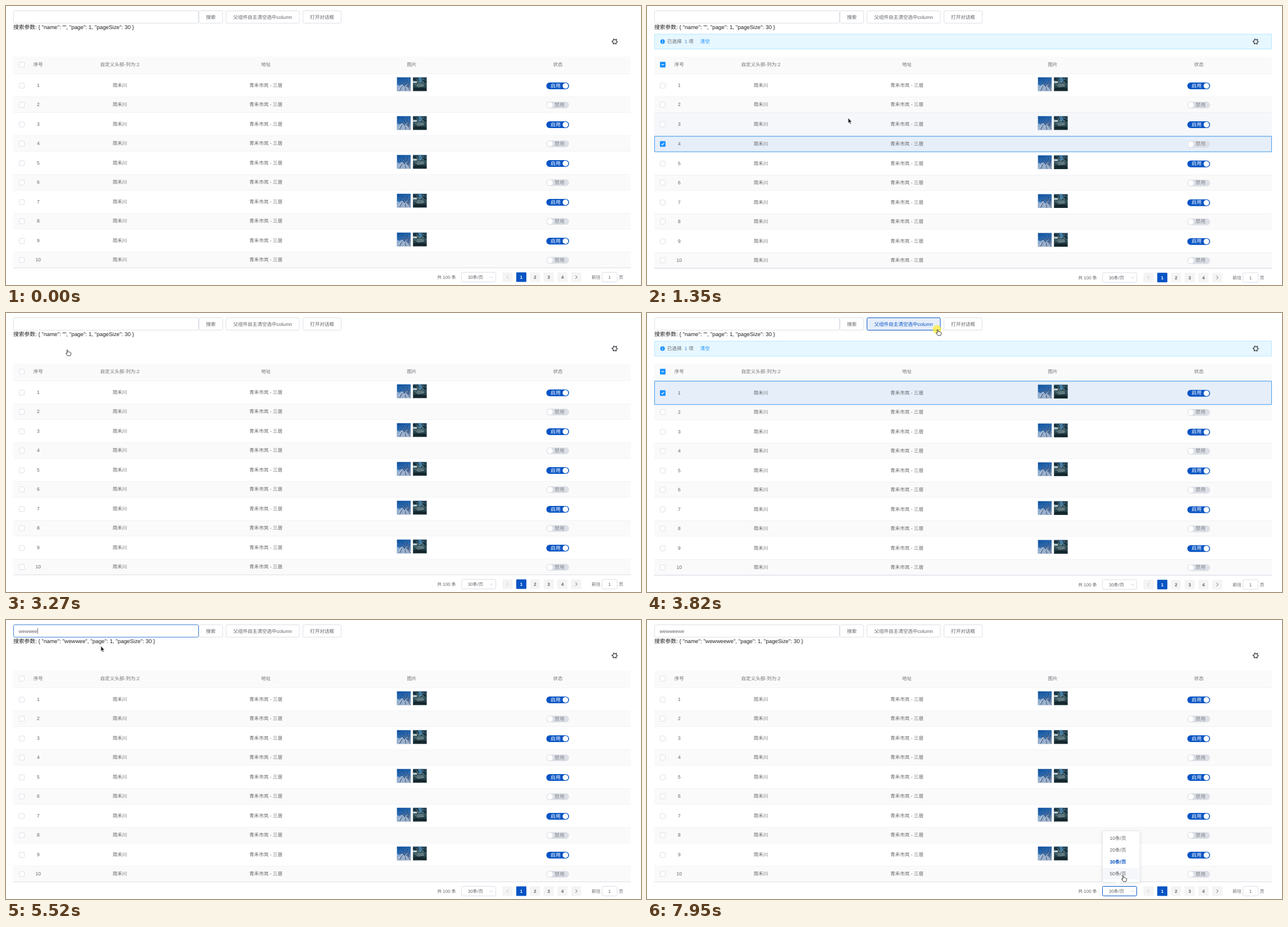
An HTML page that plays this animation: 1130x496 px, repeating every 8 s.

```html
<!DOCTYPE html>
<html lang="zh-CN">
<head>
<meta charset="utf-8">
<title>Table selection</title>
<style>
html, body { margin: 0; width: 100%; height: 100%; overflow: hidden; background: #fff; }
svg { display: block; width: 1130px; height: 496px; }
text {
  font-family: "Liberation Sans", "Noto Sans CJK SC", "Noto Sans CJK", sans-serif;
  text-rendering: geometricPrecision; white-space: pre;
}
</style>
</head>
<body>
<svg id="stage" viewBox="0 0 1130 496" xmlns="http://www.w3.org/2000/svg"></svg>
<script>
const LOOP = 8000, FS = 8.57, SMALL = 7.96, BIG = 9.79;
const BLUE = '#0754c4', SKY = '#1890ff', GREY = '#606266', LINE = '#dcdfe6';
const stage = document.getElementById('stage');
const $ = id => document.getElementById(id);

// Markup helpers: text is placed by its vertical middle.
const text = (x, y, s, o = {}) =>
  `<text x="${x}" y="${y + .36 * (o.size || FS)}" font-size="${o.size || FS}" fill="${o.fill || GREY}"` +
  ` text-anchor="${o.anchor || 'middle'}" ${o.bold ? 'font-weight="700"' : ''} ${o.id ? `id="${o.id}"` : ''}>${s}</text>`;
const rect = (x, y, w, h, fill, more = '') =>
  `<rect x="${x}" y="${y}" width="${w}" height="${h}" fill="${fill}" ${more}/>`;
const line = (d, color, w = 1, more = '') =>
  `<path d="${d}" fill="none" stroke="${color}" stroke-width="${w}" ${more}/>`;
const box = (x, y, w, h, id = '') =>
  rect(x, y, w, h, '#fff', `rx="2" stroke="${LINE}" ${id && `id="${id}"`}`);

const rowTop = i => 120.5 + 34.5 * (i - 1) + (i % 2 ? 0 : 7);
const rowHeight = i => i % 2 ? 41.5 : 27.5;

function check(x, y, id, mark) {
  return `<g transform="translate(${x} ${y})">` +
    rect(-4.5, -4.5, 9, 9, '#fff', `rx="1.2" stroke="${LINE}"`) +
    `<g id="${id}">` + rect(-5, -5, 10, 10, SKY, 'rx="1.4"') + line(mark, '#fff', 1.2) + '</g></g>';
}

function photos(y) {
  const sky = `<g transform="translate(695.7 ${y})">` + rect(0, 0, 24.5, 24.5, 'url(#sky)') +
    '<path d="M0 13L5 15 9 12 14 17 18 16 24.5 21V24.5H0Z" fill="#a9bfd8" opacity=".75"/>' +
    line('M24 24L15 11 10 5M20 18L22 8M16 24L13 14 6 10M17 14L19 4M5 24L9 15', '#39405e', .9) +
    line('M3 21L10 13M12 20L18 12', '#e4ecf4', .8) + '</g>';
  const wood = `<g transform="translate(724.2 ${y})">` + rect(0, 0, 24.5, 24.5, 'url(#wood)') +
    '<path d="M9 0H15L17 7 12 10Z" fill="#4f8fbd" opacity=".75"/>' +
    rect(0, 7, 7, 3, '#c3d0d3') + rect(7, 11, 12, 5, '#7b9298', 'opacity=".6"') +
    line('M3 12L9 17 20 15M6 3L10 9 14 8M18 2V10', '#9fb6ba', .7) +
    line('M0 3L7 5M17 5L24 9M2 20L23 21', '#0b1a20', 1.4) + '</g>';
  return sky + wood;
}

function toggle(y, on) {
  return rect(961.5, y - 6, 40.5, 12, on ? BLUE : LINE, 'rx="6"') +
    `<circle cx="${on ? 995.5 : 967.8}" cy="${y}" r="5" fill="#fff"/>` +
    text(on ? 978 : 985, y - .5, on ? '启用' : '禁用', { size: 9, fill: on ? '#fff' : '#85888e' });
}

function row(i) {
  const h = rowHeight(i), odd = i % 2, mid = odd ? 20.5 : 13;
  return `<g id="row${i}">` + rect(13, 0, 1099, h, '#fff', `id="bg${i}"`) +
    rect(13, h - .5, 1099, 1, '#e4e7ef') +
    check(28, mid + .6, 'tick' + i, 'M-2.4 0L-.6 1.9 2.5-1.9') +
    text(57.3, mid, i) + text(202.5, mid, '简禾川') + text(462.5, mid, '青禾市岚 - 三居') +
    (odd ? photos(6.3) : '') + toggle(mid + 1, odd) + '</g>';
}

function pager() {
  const cell = (x, s, on) => rect(x, 473.5, 18, 17, on ? BLUE : '#f4f4f5', 'rx="1.2"') +
    (s ? text(x + 9, 482, s, { size: SMALL, bold: 1, fill: on ? '#fff' : GREY }) : '');
  return text(784, 482, '共 100 条', { size: SMALL }) +
    box(810.5, 473.5, 61, 17, 'sizeBox') + text(835.5, 482, '30条/页', { size: SMALL }) +
    line('M861.3 481L863.8 483.5 866.3 481', '#c0c4cc', .9, 'id="chevron"') +
    cell(883.5) + line('M893.8 479L891 482 893.8 485', '#c0c4cc') +
    [1, 2, 3, 4].map(n => cell(883.6 + 24.4 * n, n, n === 1)).join('') +
    cell(1005.8) + line('M1013.5 479L1016.3 482 1013.5 485', '#606266') +
    text(1050, 482, '前往', { size: SMALL }) + box(1060.5, 473.5, 27, 17) +
    text(1074, 482, '1', { size: SMALL }) + text(1094.5, 482, '页', { size: SMALL });
}

function menu() {
  return '<g id="menu">' + rect(810.5, 375, 66.5, 91, '#fff', 'rx="2" stroke="#e4e7ed" filter="url(#shade)"') +
    rect(811, 0, 65.5, 20.8, '#f5f7fa', 'id="menuHover"') +
    [10, 20, 30, 50].map((n, k) => text(838, 388 + 21 * k, n + '条/页',
      n === 30 ? { bold: 1, fill: BLUE } : {})).join('') +
    '<path d="M833.5 465.8H842L837.8 470Z" fill="#fff"/>' + '</g>';
}

const cursors = {
  arrow: '<path d="M0 0V9.5L2.1 7.6 3.6 11 5.2 10.3 3.7 7H6.6Z" fill="#222" stroke="#fff" stroke-width=".6"/>',
  hand: '<path d="M.2 1.2Q1-.2 1.9 1.1L2.4 4.2 3.6 4 4.6 4.6 5.7 4.4 6.5 5.2Q7.6 5 7.6 6.4L7.2 9.4 6.4 11H1.8L-1.4 7.2Q-1.6 6 -.4 6.2L.8 7Z" fill="#fff" stroke="#222" stroke-width=".9" stroke-linejoin="round"/>',
  beam: line('M-2-5H-.6L0-4.5 .6-5H2M0-4.5V4.5M-2 5H-.6L0 4.5 .6 5H2', '#222', .9)
};

stage.innerHTML =
  `<defs>
    <linearGradient id="sky" x2=".35" y2="1"><stop stop-color="#0d4f9c"/><stop offset=".5" stop-color="#2c6bb0"/><stop offset="1" stop-color="#7089ab"/></linearGradient>
    <linearGradient id="wood" x2="0" y2="1"><stop stop-color="#1d3d50"/><stop offset=".5" stop-color="#35535b"/><stop offset="1" stop-color="#13262d"/></linearGradient>
    <filter id="shade" x="-20%" y="-20%" width="140%" height="140%"><feDropShadow dx="0" dy="1" stdDeviation="2.5" flood-opacity=".12"/></filter>
    <clipPath id="selClip">${rect(172, 30, 0, 14, '#000', 'id="selClipBox"')}</clipPath>
  </defs>` +
  rect(0, 0, 1130, 496, '#fff') +
  box(13.5, 8.5, 329, 22, 'field') + text(22.5, 19.5, '', { anchor: 'start', id: 'typed' }) +
  rect(0, 14.5, .8, 10, '#333', 'id="caret"') +
  box(343.5, 8.5, 42, 22) + text(364.5, 19.5, '搜索') +
  box(391.5, 8.5, 130.5, 22, 'clearBtn') + text(456.7, 19.5, '父组件自主清空选中column', { id: 'clearLabel' }) +
  box(528.5, 8.5, 68, 22) + text(562.5, 19.5, '打开对话框') +
  text(13, 37.7, '', { size: BIG, fill: '#222', anchor: 'start', id: 'params' }) +
  '<g clip-path="url(#selClip)">' + rect(0, 30, 400, 14, '#2864d0') +
  text(13, 37.7, '', { size: BIG, fill: '#fff', anchor: 'start', id: 'paramsLit' }) + '</g>' +
  '<g id="banner">' + rect(13.5, 50, 1098, 26.5, '#e6f7ff', 'stroke="#bae7ff"') +
  `<circle cx="27.7" cy="63.3" r="4" fill="${SKY}"/>` + rect(27.2, 62.6, 1, 3, '#fff') + rect(27.2, 60.9, 1, 1, '#fff') +
  text(36, 63.3, '已选择', { anchor: 'start' }) + text(69.2, 63.3, '1', { id: 'count', fill: '#3b8ad8' }) +
  text(78.5, 63.3, '项') + text(103.2, 63.3, '清空', { fill: SKY }) + '</g>' +
  '<g fill="none" stroke="#55585e"><circle cx="1083.3" cy="63.2" r="3.5" stroke-width="1.6"/>' +
  '<circle cx="1083.3" cy="63.2" r="4.8" stroke-width="1.5" stroke-dasharray="2.5 2.526" stroke-dashoffset="1.25"/></g>' +
  rect(13, 90, 1099, 30.5, '#fafafa') + rect(13, 120, 1099, 1, '#e4e7ef') +
  check(28, 104.3, 'tick0', 'M-2.6 0H2.6') +
  [[57.3, '序号'], [202.5, '自定义头部-列为:2'], [462.5, '地址'], [722, '图片'], [982, '状态']]
    .map(([x, s]) => text(x, 104, s, { fill: '#6f7277' })).join('') +
  Array.from({ length: 10 }, (_, k) => row(k + 1)).join('') +
  '<g id="foot">' + rect(13, 465, 1099, 1, '#dcdfe6') + pager() + '</g>' +
  '<path id="frames" fill="none" stroke="#3f9bee"/>' + menu() +
  '<g id="pointer"><circle id="press" r="7.6" fill="#ffee2e" opacity=".72"/>' +
  Object.keys(cursors).map(k => `<g id="${k}">${cursors[k]}</g>`).join('') + '</g>';

// Pointer stops: time, x, y
const stops = [
  [130, 440, 478], [820, 352, 246], [1060, 352, 246], [1300, 358, 199], [1770, 358, 199],
  [2480, 108, 65], [3270, 108, 65], [3400, 330, 140], [3520, 330, 140], [3760, 516, 29],
  [4080, 516, 29], [4640, 176, 24], [5250, 176, 24], [5700, 165, 58], [5960, 172, 38],
  [6040, 172, 38], [6530, 261, 40], [6650, 266, 40], [7330, 1010, 478], [7460, 1062, 482],
  [7650, 842, 482], [7760, 842, 482], [7920, 846, 454]
];
const presses = [[880, 1020], [1560, 1700], [2600, 2760], [3400, 3500], [3780, 3970], [4740, 4860], [6000, 6640], [7670, 7770]];
const picks = [[960, 1640, [4]], [1640, 2740, [3, 4]], [3430, 4000, [1]]];
const WORD = 'wewweewe', OPEN = 7720, FADE = 180;

const during = (t, [a, b]) => t >= a && t < b;
const inside = (p, x0, y0, x1, y1) => p.x >= x0 && p.x <= x1 && p.y >= y0 && p.y <= y1;
const show = (id, on) => $(id).setAttribute('visibility', on ? 'inherit' : 'hidden');
const set = (id, o) => { for (const k in o) $(id).setAttribute(k, o[k]); };

function pointerAt(t) {
  let k = stops.findIndex(s => s[0] > t);
  if (k < 0) k = stops.length;
  const a = stops[Math.max(0, k - 1)], b = stops[Math.min(k, stops.length - 1)];
  const u = b[0] > a[0] ? (t - a[0]) / (b[0] - a[0]) : 0, e = u * u * (3 - 2 * u);
  return { x: a[1] + (b[1] - a[1]) * e, y: a[2] + (b[2] - a[2]) * e };
}

function drawTop(t, p) {
  const n = t < 4960 ? 0 : Math.min(8, 1 + Math.floor((t - 4960) / 95));
  const word = WORD.slice(0, n), focus = during(t, [4780, 6620]);
  const params = `搜索参数: { "name": "${word}", "page": 1, "pageSize": 30 }`;
  if ($('typed').textContent !== word) $('typed').textContent = word;
  for (const id of ['params', 'paramsLit'])
    if ($(id).textContent !== params) $(id).textContent = params;
  set('field', { stroke: focus ? '#3f7fd6' : LINE });
  show('caret', during(t, [4780, 5980]));
  set('caret', { x: 23 + (n ? $('typed').getComputedTextLength() : 0) });

  const hover = inside(p, 391, 8, 522, 31), kept = during(t, [3780, 4780]);
  set('clearBtn', { fill: hover || kept ? '#e6eef9' : '#fff', stroke: hover ? BLUE : kept ? '#b5ccec' : LINE });
  set('clearLabel', { fill: hover || kept ? BLUE : GREY });

  const end = t < 6530 ? p.x - 20 * Math.min(1, (p.x - 172) / 40) : Math.min(266, 241 + (t - 6530) / 4);
  set('selClipBox', { width: during(t, [6040, 7670]) ? Math.max(0, end - 172) : 0 });
}

function drawTable(t, p) {
  const pick = picks.find(s => during(t, s)), rows = pick ? pick[2] : [];
  const first = rows.length ? rows[0] : 99, open = t >= OPEN;
  const fading = picks.find(s => s[1] !== 1640 && during(t, [s[1], s[1] + FADE]));
  set('banner', { opacity: pick ? 1 : fading ? 1 - (t - fading[1]) / FADE : 0 });
  if (pick || fading) $('count').textContent = (pick || fading)[2].length;
  show('tick0', pick);
  let d = '';
  for (let i = 1; i <= 10; i++) {
    const y = rowTop(i) + (i >= first ? .7 : 0), h = rowHeight(i), on = rows.includes(i);
    const hover = t >= 130 && !open && p.y >= y && p.y < y + h;
    set('row' + i, { transform: `translate(0 ${y})` });
    set('bg' + i, { fill: on ? '#e6eef9' : hover ? '#f5f7fa' : i % 2 ? '#fff' : '#fafafa' });
    show('tick' + i, on);
    if (on) d += `M13.5 ${y}H1111.5V${y + h}H13.5Z`;
  }
  set('frames', { d });
  set('foot', { transform: `translate(0 ${pick ? .7 : 0})` });

  show('menu', open);
  set('menu', { opacity: Math.min(1, Math.max(0, (t - OPEN) / 120)) });
  set('sizeBox', { stroke: open ? BLUE : inside(p, 810, 473, 872, 491) ? '#c0c4cc' : LINE });
  set('chevron', { transform: open ? 'rotate(180 863.8 482.2)' : '' });
  const item = Math.floor((p.y - 377.6) / 21);
  show('menuHover', open && item >= 0 && item < 4);
  set('menuHover', { y: 377.6 + 21 * item });
}

function drawPointer(t, p) {
  const link = inside(p, 94, 57, 113, 71) && t < 3300;
  const hand = link || inside(p, 343, 8, 597, 31) || inside(p, 810, 473, 1024, 491) || t >= OPEN;
  const beam = inside(p, 13, 8, 343, 31) || inside(p, 13, 31, 280, 45) || inside(p, 1060, 473, 1088, 491);
  const kind = hand ? 'hand' : beam ? 'beam' : 'arrow';
  show('pointer', t >= 130);
  set('pointer', { transform: `translate(${p.x} ${p.y})` });
  for (const k in cursors) show(k, k === kind);
  show('press', presses.some(s => during(t, s)));
}

function draw(t) {
  const p = pointerAt(t);
  drawTop(t, p);
  drawTable(t, p);
  drawPointer(t, p);
}

const start = performance.now();
function tick(now) {
  draw(Math.max(0, now - start) % LOOP);
  requestAnimationFrame(tick);
}
draw(0);
requestAnimationFrame(tick);
</script>
</body>
</html>
```
